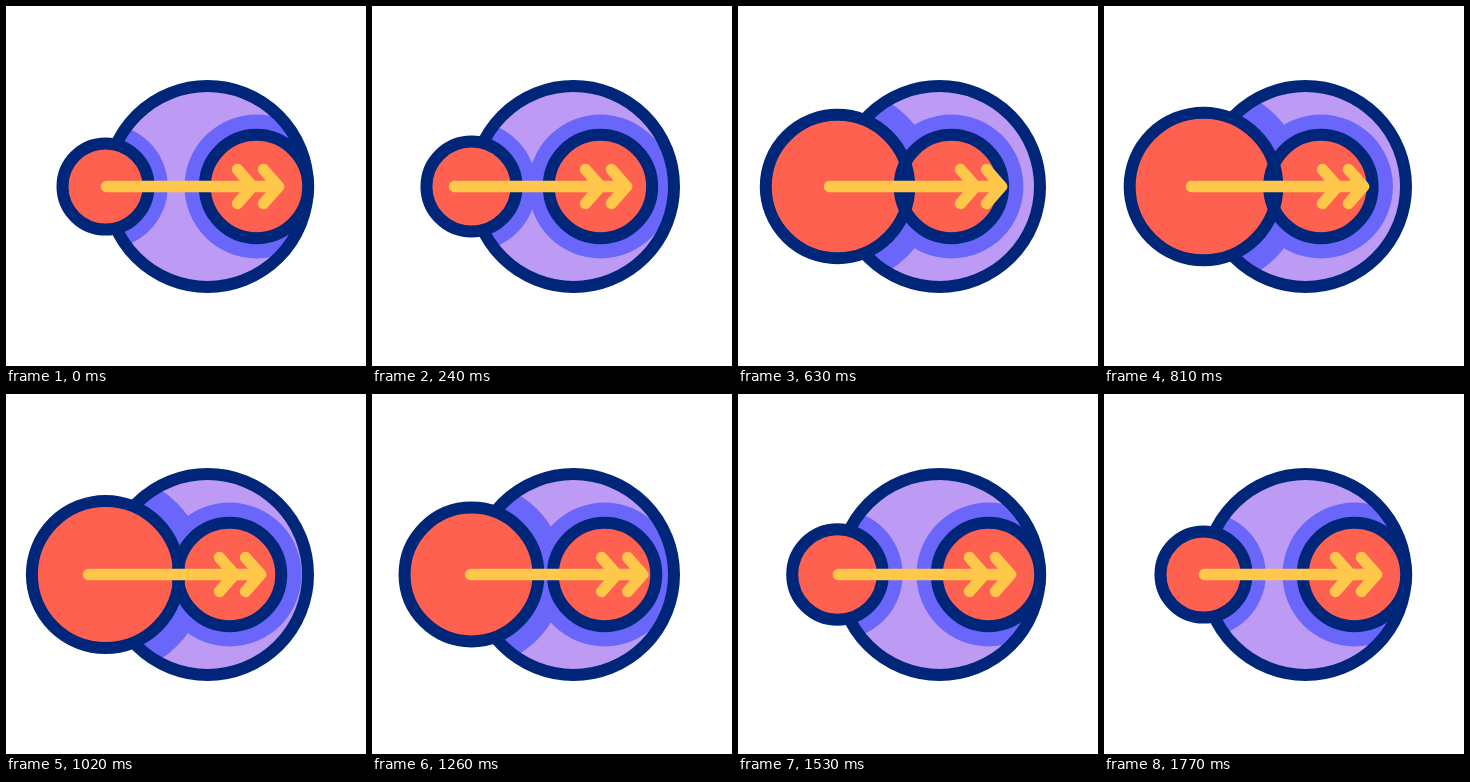
Write an HTML page with a canvas that moves like this. It is 360 px wide and 360 px high and loops after 1800 ms.

```html
<!DOCTYPE html>
<html lang="en">
<head>
<meta charset="utf-8">
<title>Circles and arrow</title>
<style>
  html, body { margin: 0; width: 100%; height: 100%; overflow: hidden; background: #fff; }
  canvas { display: block; width: 100vw; height: 100vh; object-fit: contain; }
</style>
</head>
<body>
<canvas id="stage" width="360" height="360"></canvas>
<script>
const ctx = document.getElementById('stage').getContext('2d');
const LOOP = 1800, MID = 180.5;
const NAVY = '#00267a', LILAC = '#bd9bf4', VIOLET = '#6a66fa', RED = '#ff6150', YELLOW = '#ffc84b';

// Time and offset pairs
const slide = [[0, 0], [240, -22], [600, -37.2], [1020, -27], [1260, -18], [1500, 0], [1800, 0]];
const pull = [[0, 0], [240, -18], [630, -9], [1020, -18], [1320, 0], [1800, 0]];

// Cubic bezier easing (.75, 0, .2, 1)
function ease(x) {
  let lo = 0, hi = 1;
  for (let i = 0; i < 24; i++) {
    const s = (lo + hi) / 2, q = 1 - s;
    if (2.25 * q * q * s + 0.6 * q * s * s + s * s * s < x) lo = s; else hi = s;
  }
  return lo * lo * (3 - 2 * lo);
}

function slope(keys, i) {
  if (i === 0 || i === keys.length - 1) return 0;
  const rate = j => (keys[j + 1][1] - keys[j][1]) / (keys[j + 1][0] - keys[j][0]);
  const a = rate(i - 1), b = rate(i);
  return a * b <= 0 ? 0 : 2 * a * b / (a + b);
}

// Monotone cubic through the keys
function track(keys, t) {
  let i = 0;
  while (i < keys.length - 2 && t >= keys[i + 1][0]) i++;
  const [t0, a] = keys[i], [t1, b] = keys[i + 1];
  const d = t1 - t0, u = (t - t0) / d, v = 1 - u;
  return a * (1 + 2 * u) * v * v + b * u * u * (3 - 2 * u)
    + d * u * v * (slope(keys, i) * v - slope(keys, i + 1) * u);
}

function disc(x, r, color) {
  ctx.beginPath();
  ctx.arc(x, MID, r, 0, 2 * Math.PI);
  ctx.fillStyle = color;
  ctx.fill();
}

function ring(x, outer) {
  ctx.beginPath();
  ctx.arc(x, MID, outer - 6, 0, 2 * Math.PI);
  ctx.strokeStyle = NAVY;
  ctx.lineWidth = 12;
  ctx.stroke();
}

function arrow(dx) {
  ctx.beginPath();
  ctx.moveTo(100.5 + dx, MID);
  ctx.lineTo(272.5 + dx, MID);
  for (const tip of [246.5, 272.5]) {
    ctx.moveTo(tip - 15 + dx, MID - 17);
    ctx.lineTo(tip + dx, MID);
    ctx.lineTo(tip - 15 + dx, MID + 17);
  }
  ctx.strokeStyle = YELLOW;
  ctx.lineWidth = 11.5;
  ctx.lineCap = ctx.lineJoin = 'round';
  ctx.stroke();
}

function draw(t) {
  const half = LOOP / 2;
  const grow = t < half ? ease(t / half) : 1 - ease((t - half) / half);
  const left = { x: 99.5, r: 49 + 31 * grow };
  const right = { x: 250.5 + track(slide, t), r: 57.7 };

  ctx.fillStyle = '#fff';
  ctx.fillRect(0, 0, 360, 360);

  ctx.save();
  ctx.beginPath();
  ctx.arc(201.5, MID, 101, 0, 2 * Math.PI);
  ctx.clip();
  disc(201.5, 104, LILAC);
  disc(left.x, left.r * 1.27, VIOLET);
  disc(right.x, 72, VIOLET);
  ctx.restore();

  ring(201.5, 106.5);
  for (const c of [right, left]) disc(c.x, c.r - 6, RED);
  for (const c of [right, left]) ring(c.x, c.r);
  arrow(track(pull, t));
}

const start = performance.now();
function tick() {
  draw((performance.now() - start) % LOOP);
  requestAnimationFrame(tick);
}
tick();
</script>
</body>
</html>
```
